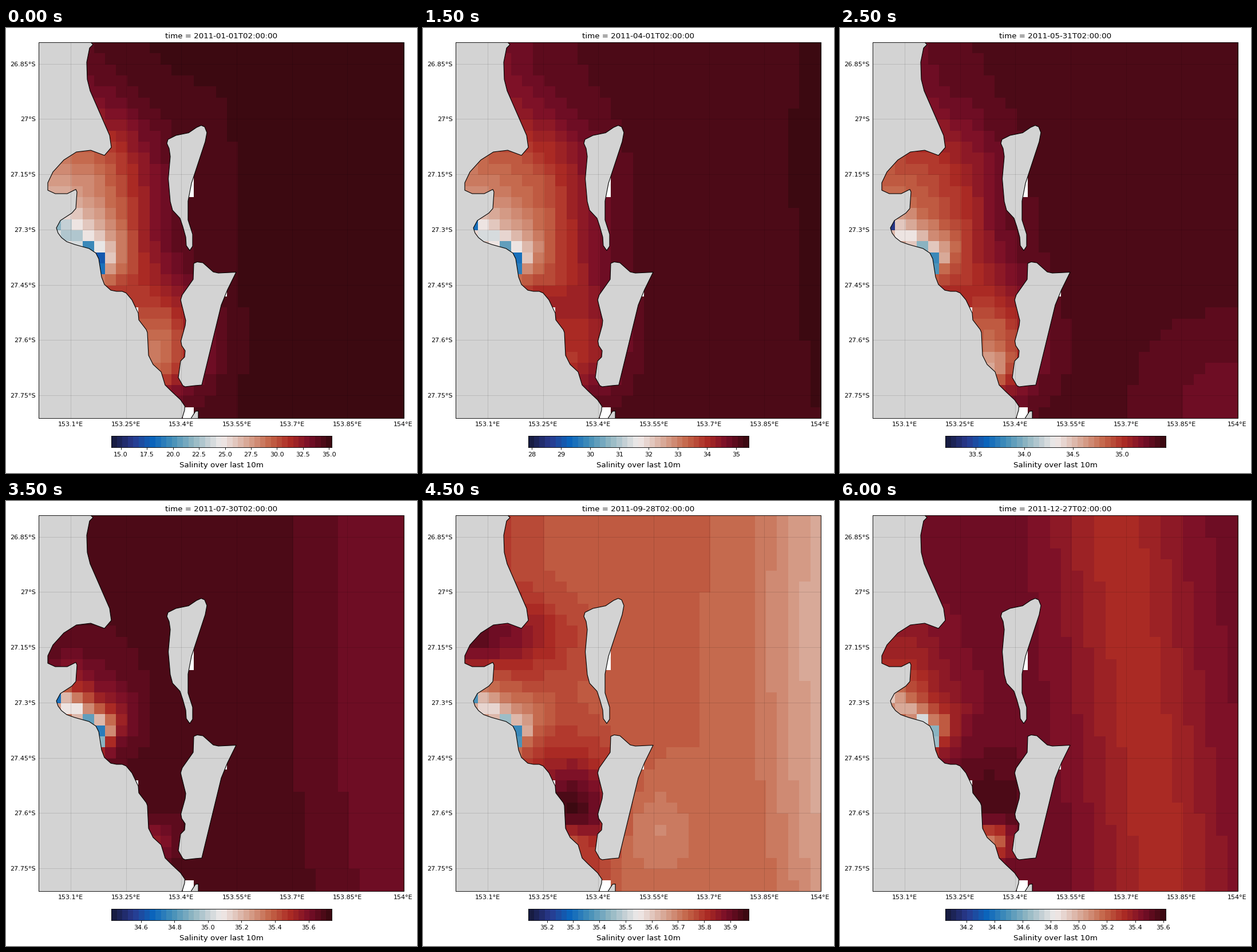
Write a matplotlib script that moves like this. It is 718 px wide and 779 px high and loops after 6500 ms.

```python
import numpy as np
import matplotlib.pyplot as plt
from matplotlib.animation import FuncAnimation
from matplotlib.colors import LinearSegmentedColormap
from matplotlib.patches import Polygon, Rectangle
from matplotlib.ticker import MaxNLocator

W, H, DPI = 718, 779, 64
PT = 80 / DPI                      # type and lines are sized for 80 dpi
CELL, COLS, ROWS = 19.345, 33, 34
LEFT, TOP = 57.0, 24.8
RIGHT, BOTTOM = LEFT + CELL * COLS, TOP + CELL * ROWS
SHADES = 40
FRAMES = 13

plt.rcParams["font.family"] = "DejaVu Sans"

# Diverging blue - white - red scale
STOPS = [(0, "#171c42"), (1, "#293a8f"), (2, "#0b66bd"), (3, "#4590b9"),
         (4, "#8eb5c2"), (5, "#d2d8db"), (5.5, "#f1eceb"), (6, "#e6d2cc"),
         (7, "#d59d89"), (8, "#c46548"), (9, "#ac2b24"), (10, "#780e28"),
         (11, "#3c0911")]
SCALE = LinearSegmentedColormap.from_list(
    "salinity", [(p / 11, c) for p, c in STOPS], N=SHADES)
SCALE.set_bad("white")

ROW, COL = np.mgrid[:ROWS, :COLS].astype(float)
EMPTY = [(13, 12), (13, 13), (16, 22), (8, 24), (13, 33)]
OUTLETS = [(4, 18, 12), (5, 19, 29), (5, 20, 36)]   # column, row, freshness
WEST_OUTLET = (1, 16)


def rise(x):
    return 1 / (1 + np.exp(-x))


def blob(col, row, wide, high):
    return np.exp(-((COL - col) / wide) ** 2 / 2 - ((ROW - row) / high) ** 2 / 2)


def plume_shape():
    """Fresh water that fades away from the shore between two outlets."""
    start, end = np.array([1, 16]), np.array([5.5, 19])
    length = np.hypot(*(end - start))
    ux, uy = (end - start) / length
    along = (COL - start[0]) * ux + (ROW - start[1]) * uy
    across = (COL - start[0]) * uy - (ROW - start[1]) * ux
    beyond = along - np.clip(along, 0, length)
    return np.exp(-np.hypot(across, 2 * beyond) / 1.55)


def bay_shape(edge):
    return rise((edge - COL) / 1.8) * rise((ROW - 8) / 2) * rise(22 - ROW)


PLUME = plume_shape()
SOUTH = blob(10, 26.5, 3, 3.5)
CREEK = blob(10, 29, 1.4, 1.2)
COVE = blob(2, 10.5, 4.5, 2.2)
COAST = np.exp((4 - COL) / 4) * rise((10 - ROW) / 2)
SHELF = rise((18 - COL) / 1.2) * rise(ROW - 3)
BAND = np.exp(-((COL - 21.5 - 0.13 * ROW) / 4.2) ** 2 / 2)
BEND = 0.004 * (ROW - 10) ** 2

steps, ranges, fields = [], [], []


def add_key(step, low, high, sea, bay=0, edge=9, plume=28, south=0, creek=0,
            coast=0, cove=0, shelf=0, band=0, west=22,
            east=(0, 25), pool=(0, 0, 0, 1)):
    """One date: the open sea less its fresher parts, in percent of the scale."""
    amount, col, row, size = pool
    water = (sea - bay * bay_shape(edge) - plume * PLUME - south * SOUTH
             - creek * CREEK - coast * COAST - cove * COVE - shelf * SHELF
             - band * BAND - amount * blob(col, row, size, size)
             - east[0] * rise((COL - east[1] - BEND) / 1.7))
    for c, r, fresh in OUTLETS + [(*WEST_OUTLET, west)]:
        water[r, c] -= fresh
    steps.append(step)
    ranges.append((low, high))
    fields.append(water)


add_key(0, 14.09, 35.25, sea=100, bay=36, edge=8, south=27, creek=6, coast=4,
        shelf=1.5, west=0)
add_key(3, 27.88, 35.43, sea=97.5, bay=28, edge=10, south=16, creek=3, coast=6,
        east=(-2.5, 30))
add_key(5, 33.19, 35.452, sea=97.5, bay=23, edge=9, south=25, creek=16,
        coast=4, west=38, pool=(5, 31, 32, 5))
add_key(7, 34.424, 35.738, sea=97.7, bay=2, plume=52, south=1, creek=9,
        east=(5, 23.5))
add_key(9, 35.129, 35.97, sea=73.3, bay=-4, edge=11, south=-27, creek=17,
        coast=-5, cove=-15, east=(13, 28.5), pool=(7, 16.5, 28, 3))
add_key(10, 34.698, 35.721, sea=97.7, bay=26, edge=7.5, south=18, creek=20,
        shelf=5, east=(2, 31), pool=(5, 22, 30, 3.5))
add_key(12, 34.049, 35.618, sea=92.5, bay=10, edge=5, south=-6.5, creek=28,
        band=10.5, west=0)


def between_keys(keys, step):
    """Straight blend of the two keys around a step."""
    i = min(np.searchsorted(steps, step, side="right"), len(steps) - 1)
    t = (step - steps[i - 1]) / (steps[i] - steps[i - 1])
    return (1 - t) * np.array(keys[i - 1]) + t * np.array(keys[i])


def shades(step):
    level = np.clip(between_keys(fields, step) / 100, 0, 1)
    shade = np.round(level * (SHADES - 1))
    for col, row in EMPTY:
        shade[row, col] = np.nan
    return np.ma.masked_invalid(shade)


# Coastlines in pixels
MAINLAND = [
    (40, 10), (144, 10), (148, 25), (152, 29), (146, 35), (141, 60), (142, 90),
    (147, 110), (181, 188), (184, 209), (172, 223), (148, 214), (123, 217),
    (101, 231), (82, 252), (73, 271), (73, 284), (86, 290), (107, 290),
    (122, 282.5), (124, 287), (122, 316), (115, 324), (95, 337), (88, 350),
    (91, 359), (97, 367), (106, 374), (120, 379), (145, 386), (157, 394),
    (162, 404), (167, 436), (172, 449), (183, 459), (193, 461), (203, 461),
    (210, 464), (220, 476), (231, 499), (232, 511), (245, 528), (247, 533),
    (249, 573), (257, 589), (271, 602), (278, 625), (289, 636), (305, 651),
    (312.5, 662), (312, 669), (304, 695), (40, 695)]
NORTH_ISLAND = [
    (283, 195), (297, 188), (319, 183.5), (333, 174), (341, 170.5),
    (347, 173), (351, 183), (348, 199), (324, 272), (318, 303), (318, 336),
    (326, 361), (326, 382), (321, 389.5), (315, 381), (314, 366), (309, 348),
    (304, 333), (291, 319), (287, 304), (283.5, 264), (287, 225), (285, 211),
    (281, 202)]
SOUTH_ISLAND = [
    (328, 412), (334, 409.5), (344, 411), (362, 427), (371, 429),
    (402, 427.5), (387, 458), (376, 485), (342, 625), (330, 626), (313, 628),
    (309, 626), (301, 612), (305, 583), (312, 576), (313, 565), (307, 556),
    (305.5, 548), (313, 521), (314, 512), (305, 476), (308, 467), (327, 440)]
ISLET = [(317, 695), (324, 682), (331, 671), (336, 670.5), (336, 695)]

fig = plt.figure(figsize=(W / DPI, H / DPI), dpi=DPI, facecolor="white")
ax = fig.add_axes([0, 0, 1, 1])
ax.axis("off")
water = ax.imshow(shades(0), cmap=SCALE, vmin=0, vmax=SHADES - 1,
                  extent=(LEFT, RIGHT, BOTTOM, TOP), aspect="auto",
                  interpolation="nearest")
ax.set_xlim(0, W)
ax.set_ylim(H, 0)

frame = Rectangle((LEFT, TOP), RIGHT - LEFT, BOTTOM - TOP, fill=False,
                  ec="black", lw=0.8 * PT, zorder=4)
ax.add_patch(frame)
for shore in (MAINLAND, NORTH_ISLAND, SOUTH_ISLAND, ISLET):
    land = ax.add_patch(Polygon(shore, fc="lightgray", ec="black", lw=PT,
                                joinstyle="round"))
    land.set_clip_path(frame)


def degrees(value, side):
    return f"{value:.2f}".rstrip("0").rstrip(".") + "°" + side


grid = dict(color="black", alpha=0.13, lw=0.8 * PT)
for i in range(7):
    x, y = 112.8 + 5 * CELL * i, 62.6 + 5 * CELL * i
    ax.plot([x, x], [TOP, BOTTOM], **grid)
    ax.plot([LEFT, RIGHT], [y, y], **grid)
    ax.text(x, 697, degrees(153.1 + 0.15 * i, "E"), size=10 * PT, ha="center")
    ax.text(52, y + 4, degrees(26.85 + 0.15 * i, "S"), size=10 * PT, ha="right")

middle = (LEFT + RIGHT) / 2
title = ax.text(middle, 18, "", size=12 * PT, ha="center")
ax.text(middle, 769, "Salinity over last 10m", size=12 * PT, ha="center")

bar = fig.add_axes([184 / W, 1 - 734 / H, 385 / W, 20 / H])
strip = bar.imshow([np.arange(SHADES)], cmap=SCALE, aspect="auto",
                   interpolation="nearest", extent=(0, 1, 0, 1))
bar.set_yticks([])
bar.xaxis.set_major_locator(MaxNLocator(9, steps=[1, 2, 2.5, 5, 10]))
bar.ticklabel_format(axis="x", useOffset=False)
bar.tick_params(axis="x", labelsize=10 * PT, length=3.5 * PT, pad=3.5 * PT,
                width=0.8 * PT)
for spine in bar.spines.values():
    spine.set_linewidth(0.8 * PT)

START = np.datetime64("2011-01-01T02:00:00")


def draw(step):
    water.set_data(shades(step))
    title.set_text(f"time = {START + np.timedelta64(30 * step, 'D')}")
    low, high = between_keys(ranges, step)
    strip.set_extent((low, high, 0, 1))
    bar.set_xlim(low, high)
    return water, title, strip


anim = FuncAnimation(fig, draw, frames=FRAMES, interval=500, repeat=True,
                     repeat_delay=0, blit=False)
plt.show()
```
